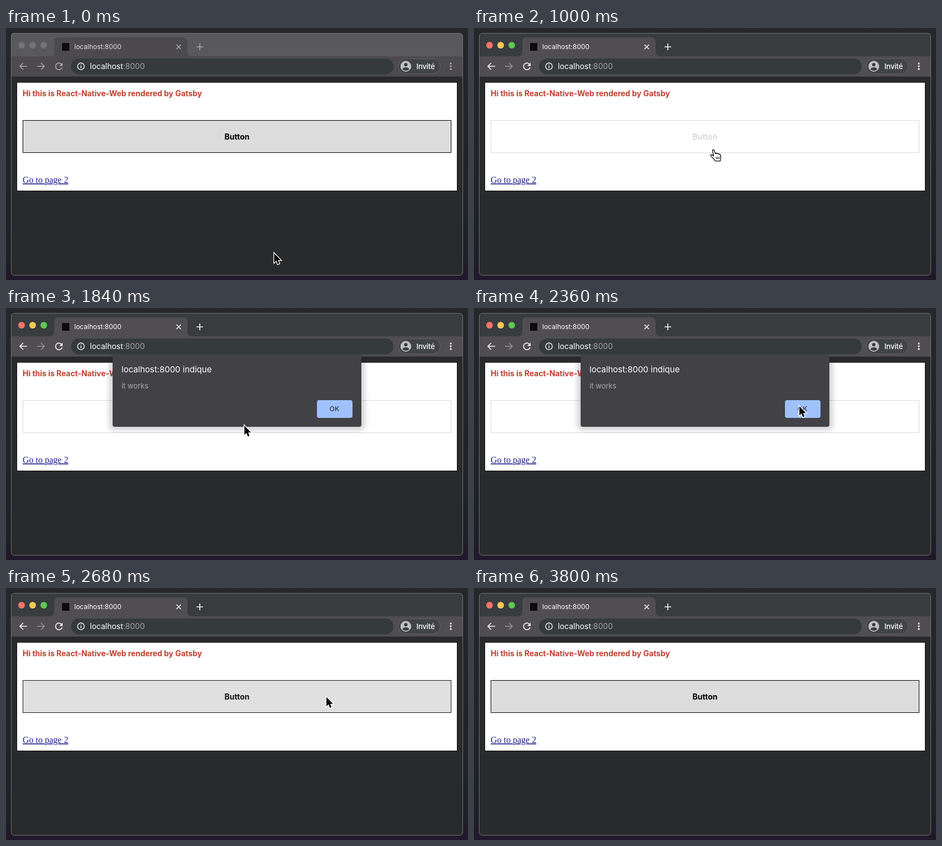
Recreate the animation shown at these times as an HTML page. Size 832 by 454 pixels, loop 3840 ms.

```html
<!DOCTYPE html>
<html lang="en">
<head>
<meta charset="utf-8">
<title>localhost:8000</title>
<style>
  html, body { margin: 0; width: 100%; height: 100%; overflow: hidden; background: #202227; }
  svg { position: absolute; left: 0; top: 0; width: 832px; height: 454px; overflow: hidden; }
  text { font-family: Inter, Roboto, sans-serif; fill: #fff; }
  #dialog { transform-origin: 416px 214px; }
  .strip { fill: #383c3e; }
  .bar { fill: #504e53; }
  .icon { fill: none; stroke: #f1f1f2; stroke-width: 1.7; }
  .dots { fill: #f1f1f2; }
  .off { stroke: #929195; }
  .idle .strip { fill: #59595c; }
  .idle .bar { fill: #4c4a4f; }
  .idle .icon { stroke: #a5a4a8; }
  .idle .dots { fill: #a5a4a8; }
  .idle .light { fill: #737477; }
  .idle .tab { fill: #dededf; }
  .bold { font-size: 14px; font-weight: 700; letter-spacing: -.06px; }
  .link { font: 16px "Liberation Serif", serif; fill: #1b1d88; text-decoration: underline; }
</style>
</head>
<body>
<svg id="scene" viewBox="0 0 832 454">
  <defs>
    <linearGradient id="desk" x2="0" y2="1">
      <stop offset="0" stop-color="#25272a"/>
      <stop offset=".9" stop-color="#1e2129"/>
      <stop offset="1" stop-color="#21172a"/>
    </linearGradient>
    <clipPath id="frame"><rect x="9" y="9" width="814" height="437" rx="6"/></clipPath>
  </defs>
  <rect width="832" height="454" fill="url(#desk)"/>
  <g clip-path="url(#frame)">
    <rect x="9" y="9" width="814" height="437" fill="#292a2c"/>
    <rect class="strip" x="9" y="9" width="814" height="43"/>
    <path class="bar" d="M9 51H79Q87 51 87 43V25Q87 17 95 17H319Q327 17 327 25V43Q327 51 335 51H823V87.5H9Z"/>
  </g>
  <rect x="9.5" y="9.5" width="813" height="436" rx="5.5" fill="none" stroke="#707173"/>

  <circle class="light" cx="28" cy="31" r="6" fill="#fb7568"/>
  <circle class="light" cx="48" cy="31" r="6" fill="#f5cb52"/>
  <circle class="light" cx="68" cy="31" r="6" fill="#62c655"/>
  <rect x="101" y="27" width="13" height="14" fill="#0c0c0d"/>
  <text class="tab" x="123" y="38" font-size="12">localhost:8000</text>
  <path class="icon" d="M307 30l8 8m0-8l-8 8"/>
  <path class="icon" d="M343 34h12m-6-6v12"/>

  <path class="icon" d="M38 69H25m6-6l-6 6 6 6"/>
  <path class="icon off" d="M56 69H69m-6-6l6 6-6 6"/>
  <path class="icon" d="M100 65.5A6 6 0 1 0 101 71"/>
  <path class="dots" d="M102 62.5v6h-6z"/>

  <rect x="117" y="55" width="581" height="28.5" rx="14.2" fill="#353a3c"/>
  <circle cx="135" cy="69" r="6" fill="none" stroke="#f1f1f2" stroke-width="1.5"/>
  <path d="M135 68v4.2m0-6.8v1.4" stroke="#f1f1f2" stroke-width="1.5"/>
  <text x="151" y="74" font-size="14">localhost<tspan fill="#a3a5a8">:8000</tspan></text>

  <rect x="706.5" y="55.5" width="75.5" height="27" rx="13.5" fill="#414346" stroke="#606164"/>
  <circle cx="720" cy="69" r="9.7" fill="#bfc0c4"/>
  <circle cx="720" cy="66" r="3.1" fill="#3b3d40"/>
  <path d="M713.8 74.2Q716 70.8 720 70.8T726.2 74.2Q724 77 720 77T713.8 74.2Z" fill="#3b3d40"/>
  <text x="739" y="74" font-size="13" font-weight="500" letter-spacing="-.1">Invité</text>
  <g class="dots">
    <circle cx="801" cy="64" r="1.7"/><circle cx="801" cy="69" r="1.7"/><circle cx="801" cy="74" r="1.7"/>
  </g>

  <rect x="19.5" y="98" width="793" height="195.5" fill="#fff" stroke="#0a0a0a"/>
  <text class="bold" x="30" y="123" style="fill:#c0402f">Hi this is React-Native-Web rendered by Gatsby</text>
  <rect id="fill" x="30" y="166" width="772" height="59"/>
  <g id="label">
    <rect x="30.5" y="166.5" width="771" height="58" fill="none" stroke="#000"/>
    <text class="bold" x="416" y="201" text-anchor="middle" style="fill:#000">Button</text>
  </g>
  <text class="link" x="30" y="279">Go to page 2</text>
</svg>

<svg id="dialog" viewBox="0 0 832 454">
  <defs>
    <filter id="soft" x="-10%" y="-20%" width="120%" height="140%"><feGaussianBlur stdDeviation="5"/></filter>
  </defs>
  <rect x="186" y="92" width="460" height="128" rx="8" opacity=".17" filter="url(#soft)"/>
  <path d="M192 84H640V210Q640 214 636 214H196Q192 214 192 210Z" fill="#424146"/>
  <text x="208" y="116" font-size="15">localhost:8000 indique</text>
  <text x="208" y="145" font-size="13" style="fill:#a8a8ab">it works</text>
  <rect x="560" y="166" width="64" height="32" rx="4" fill="#9fc1fb"/>
  <text x="591.5" y="186" font-size="12" font-weight="500" text-anchor="middle" style="fill:#30363f">OK</text>
</svg>

<svg id="pointer" viewBox="0 0 832 454">
  <g id="cursor">
    <path id="arrow" d="M0 0V16.5L3.9 13 6.3 19.5 9.2 18.3 6.7 12.3H11.8Z" stroke="#fff" stroke-width="2.6" paint-order="stroke"/>
    <g id="hand" transform="translate(-4.7 4)" fill="#fff" stroke="#111" stroke-width="1.4" stroke-linejoin="round">
      <path d="M4.6 3.6C4 1.4 6.8 .6 7.6 2.6L9.6 8.5C9.9 7.2 12 7 12.6 8.8 13.2 7.6 15.2 7.8 15.6 9.6 16.4 8.6 18.4 9 18.8 11L19.4 14C19.8 17 18.6 18.5 18.4 21.6H9.4C8.4 18.5 4 15.5 1.6 12.6 .4 11 2.2 9.6 3.8 10.6L6.6 12.6Z"/>
      <path d="M11 14.2l.6 4.2m2-4.4l.4 4.4m2.2-4.4l.1 4.2" fill="none" stroke-width="1.1"/>
    </g>
  </g>
</svg>

<script>
const LOOP = 3840;
const $ = id => document.getElementById(id);
const scene = $('scene'), dialog = $('dialog'), fill = $('fill'), label = $('label');
const cursor = $('cursor'), arrow = $('arrow'), hand = $('hand');

const ramp = (t, from, to) => Math.min(1, Math.max(0, (t - from) / (to - from)));
const easeOut = k => 1 - (1 - k) ** 2;
const smooth = k => k * k * (3 - 2 * k);
const mix = (a, b, k) => a + (b - a) * k;
const show = (el, on) => { el.style.display = on ? '' : 'none'; };

// Each move: start, end, x, y
const START = [483, 406];
const MOVES = [
  [440, 880, 429.7, 214],
  [1700, 1820, 429.3, 212],
  [1980, 2360, 586, 177],
  [2600, 3060, 476.3, 415],
  [3090, 3400, 472, 475]
];

function cursorAt(t) {
  let [x, y] = START;
  for (const [from, to, nx, ny] of MOVES) {
    const k = smooth(ramp(t, from, to));
    x = mix(x, nx, k);
    y = mix(y, ny, k);
  }
  return [x, y];
}

function drawButton(t) {
  const lit = 1 - easeOut(ramp(t, 880, 990)) + easeOut(ramp(t, 2520, 2760));
  const tone = Math.round(mix(254, 220, lit));
  fill.setAttribute('fill', `rgb(${tone},${tone},${tone})`);
  label.setAttribute('opacity', mix(.14, 1, lit));
}

function drawDialog(t) {
  const hidden = 1 - ramp(t, 1720, 1820) + ramp(t, 2520, 2640);
  show(dialog, hidden < 1);
  dialog.style.opacity = 1 - hidden;
  dialog.style.transform = hidden === 0 ? 'none' :
    `translateY(${-18 * hidden}px) perspective(400px) rotateX(${12 * hidden}deg) scaleY(${1 + .06 * hidden})`;
}

function drawCursor(t) {
  const [x, y] = cursorAt(t);
  const pointing = t < 1160 && y < 225;
  cursor.setAttribute('transform', `translate(${x} ${y})`);
  show(cursor, t < 3400);
  show(hand, pointing);
  show(arrow, !pointing);
}

function draw(t) {
  scene.classList.toggle('idle', t < 160);
  drawButton(t);
  drawDialog(t);
  drawCursor(t);
}

function tick() {
  draw(performance.now() % LOOP);
  requestAnimationFrame(tick);
}
tick();
</script>
</body>
</html>
```
